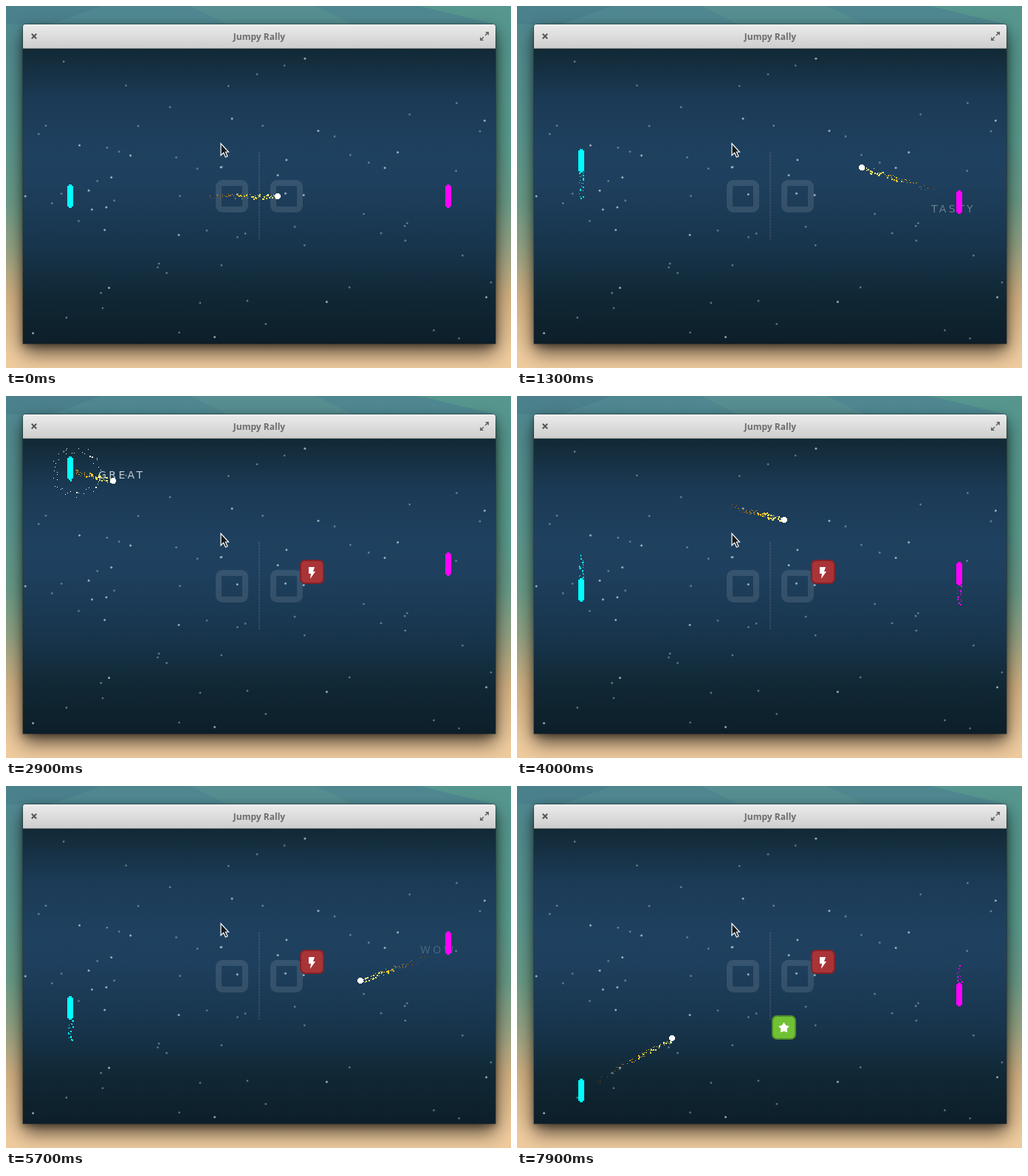
Write an HTML page with a canvas that moves like this. It is 684 px wide and 491 px high and loops after 8 s.

```html
<!DOCTYPE html>
<html lang="en">
<head>
<meta charset="utf-8">
<style>
  html, body { margin: 0; width: 684px; height: 491px; overflow: hidden; }
  body {
    position: relative;
    background: linear-gradient(#4f8791, #5a9690 35%, #6b9c88 54%, #93a384 66%, #d3b183 80%, #efcb9e 96%);
  }
  .wall, .over { position: absolute; left: 0; top: 0; }
  .window {
    position: absolute; left: 23px; top: 25px; width: 640px; height: 433px;
    border-radius: 4px 4px 0 0;
    box-shadow: 0 0 0 1px rgba(0,0,0,.25), 0 12px 26px rgba(0,0,0,.65), 0 3px 8px rgba(0,0,0,.35);
  }
  .bar {
    height: 32px; border-radius: 4px 4px 0 0; border-bottom: 1px solid #8c8c8c;
    background: linear-gradient(#ebebeb, #cecece); box-shadow: inset 0 1px #f6f6f6;
    font: bold 12px/33px "Open Sans", sans-serif; text-align: center; color: #6c6c6c;
  }
  canvas { display: block; }
</style>
</head>
<body>
<svg class="wall" width="684" height="491">
  <path d="M0 0H130L60 25H0Z" fill="#467d89" opacity=".5"/>
  <path d="M250 0H420L470 25H300Z" fill="#5f9895" opacity=".4"/>
  <path d="M560 0H684V230L663 180V25Z" fill="#5ba08e" opacity=".6"/>
</svg>
<div class="window">
  <div class="bar">Jumpy Rally</div>
  <canvas width="640" height="400"></canvas>
</div>
<svg class="over" width="684" height="491">
  <path d="M34.8 37.8l6.4 6.4M41.2 37.8l-6.4 6.4" stroke="#555" stroke-width="2"/>
  <path d="M649 40l4-4M647 42l-4 4" stroke="#666" stroke-width="1.6"/>
  <path d="M649 35H654V40ZM642 42V47H647Z" fill="#666"/>
  <path d="M291 186.5V202.5L294.7 199 297.4 205 300 203.8 297.4 198H301.5Z" fill="#16191c" stroke="#fff" stroke-width="1.2"/>
</svg>
<script>
const ctx = document.querySelector('canvas').getContext('2d');
const LOOP = 8000, STEP = 100;
const HOLD = 50;            // the ball rests on a paddle this long
const SPEED = .15;          // paddle speed, px per ms
const SHAKE = 280, WORD = 600, BURST = 440;

const serve = { t: -HOLD, x: 368, y: 258 };
const hits = [
  { t: 818, x: 591, y: 258, word: 'TASTY', wx: 561, wy: 275 },
  { t: 2596, x: 95, y: 103, word: 'GREAT', wx: 125, wy: 107 },
  { t: 5161, x: 591, y: 223, word: 'WOW', wx: 561, wy: 222 },
  { t: 7405, x: 95, y: 407 }
];
const stops = [serve, ...hits, { t: LOOP, x: 236, y: 327 }];

// Each move is [start time, y to head for].
const paddles = [
  { x: 87, color: '#0ff', moves: [[980, 165], [2200, 98], [2900, 368], [5253, 286], [6040, 423], [7500, 413]] },
  { x: 599, color: '#f0f', moves: [[600, 266], [1600, 228], [3000, 270], [3807, 213], [6200, 258], [7733, 290]] }
];

const rnd = n => { const s = Math.sin(n * 12.9898) * 43758.5453; return s - Math.floor(s); };
const spread = (n, size) => (rnd(n) - .5) * size;

function ballAt(t) {
  let i = 1;
  while (i < stops.length - 1 && t >= stops[i].t + HOLD) i++;
  const a = stops[i - 1], b = stops[i];
  const k = Math.min(1, (t - a.t - HOLD) / (b.t - a.t - HOLD));
  return [a.x + (b.x - a.x) * k, a.y + (b.y - a.y) * k];
}

function paddleAt(moves, t) {
  let y = 258;
  for (const [begin, goal] of moves) {
    const reach = Math.max(0, t - begin) * SPEED;
    y += Math.max(-reach, Math.min(reach, goal - y));
  }
  return y;
}

function rect(color, x, y, w, h = w) {
  ctx.fillStyle = color;
  ctx.fillRect(Math.round(x), Math.round(y), w, h);
}

function poly(points, color) {
  ctx.beginPath();
  points.forEach(p => ctx.lineTo(...p));
  ctx.closePath();
  ctx.fillStyle = color;
  ctx.fill();
}

function drawField() {
  for (let i = 1; i <= 80; i++) {
    const bright = i % 3 === 0;
    ctx.fillStyle = bright ? 'rgba(205,220,228,.7)' : 'rgba(165,190,203,.5)';
    ctx.beginPath();
    ctx.arc(26 + 634 * rnd(i), 64 + 390 * rnd(i + 200), bright ? 1.5 : 1.4, 0, 7);
    ctx.fill();
  }
  for (let y = 198; y < 318; y += 4) rect('rgba(190,160,180,.16)', 342, y, 2, 3);
  ctx.strokeStyle = 'rgba(255,255,255,.11)';
  ctx.lineWidth = 8;
  for (const x of [288, 362]) {
    ctx.beginPath();
    ctx.roundRect(x, 240, 36, 36, 5);
    ctx.stroke();
  }
}

function drawTile(x, y, fill, edge) {
  ctx.beginPath();
  ctx.roundRect(x + 1, y + 1, 31, 31, 6);
  ctx.fillStyle = fill;
  ctx.fill();
  ctx.strokeStyle = edge;
  ctx.lineWidth = 2;
  ctx.stroke();
}

function drawBonuses(t) {
  if (t >= 2300) {
    drawTile(398, 222, '#a93438', '#852227');
    poly([[410, 232], [418, 232], [416, 238], [419, 238], [412, 248], [413, 241], [410, 241]], '#fff');
  }
  if (t >= 7600) {
    drawTile(345, 311, '#70c234', '#528f2c');
    const star = Array.from({ length: 10 }, (_, i) => {
      const r = i % 2 ? 4.4 : 7.6, a = i * Math.PI / 5;
      return [361.5 + r * Math.sin(a), 328 - r * Math.cos(a)];
    });
    poly(star, '#fff');
  }
}

function drawWord({ word, wx, wy }, age) {
  ctx.globalAlpha = 1 - (age / WORD) ** 2;
  ctx.fillStyle = '#fff';
  ctx.font = '14px "DejaVu Sans", sans-serif';
  ctx.letterSpacing = '3.4px';
  ctx.fillText(word, wx, wy + 5);
  ctx.globalAlpha = 1;
}

function drawBurst({ x, y }, age) {
  for (let i = 0; i < 46; i++) {
    const a = i * Math.PI / 23 + spread(i, .2), r = age * (.085 + .03 * rnd(i + 90));
    rect('#fff', x + r * Math.cos(a), y + r * Math.sin(a), rnd(i + 50) > .8 ? 2 : 1);
  }
}

function drawBallTrail(t) {
  for (let k = Math.ceil((t - 430) / 4); k * 4 < t; k++) {
    const age = t - k * 4;
    if (age > 120 + 310 * rnd(k)) continue;
    const [x, y] = ballAt(k * 4);
    const size = age < 200 && rnd(k + 7000) > .55 ? 2 : 1;
    rect(`hsl(${60 - age * .09} 100% ${78 - age * .13}%)`, x + spread(k + 3000, 4), y + spread(k + 5000, 7), size);
  }
}

function drawPaddle({ x, color, moves }, t) {
  for (let k = Math.ceil((t - 280) / 9); k * 9 < t; k++) {
    const y = paddleAt(moves, k * 9), dir = Math.sign(y - paddleAt(moves, k * 9 - 9));
    if (!dir || t - k * 9 > 130 + 150 * rnd(k + 600)) continue;
    rect(color, x + spread(k, 7), y - dir * 15 + spread(k + 400, 4), rnd(k + 800) > .7 ? 2 : 1);
  }
  const y = paddleAt(moves, t);
  rect(color, x - 4, y - 14, 8, 28);
  rect(color, x - 2, y - 16, 4, 32);
}

function drawBall(t) {
  const [x, y] = ballAt(t);
  rect('#fff', x - 4, y - 2, 8, 4);
  rect('#fff', x - 2, y - 4, 4, 8);
  rect('#fff', x - 3, y - 3, 6);
}

const sky = ctx.createLinearGradient(0, 58, 0, 458);
[[0, '#122935'], [.17, '#1b3a55'], [.36, '#1f4160'], [.46, '#1e3f5d'], [.68, '#17344b'],
  [.85, '#102733'], [1, '#0c1e29']].forEach(stop => sky.addColorStop(...stop));

function draw(t) {
  // Draw in page coordinates.
  ctx.setTransform(1, 0, 0, 1, -23, -58);
  ctx.fillStyle = sky;
  ctx.fillRect(23, 58, 640, 400);
  const hit = hits.findLast(h => t >= h.t), age = hit ? t - hit.t : Infinity;
  if (age < SHAKE) {
    const size = 12 * (1 - age / SHAKE);
    ctx.translate(Math.round(spread(t, size)), Math.round(spread(t + 9, size)));
  }
  drawField();
  drawBonuses(t);
  if (age < WORD && hit.word) drawWord(hit, age);
  drawBallTrail(t);
  for (const p of paddles) drawPaddle(p, t);
  drawBall(t);
  if (age < BURST) drawBurst(hit, age);
}

const start = performance.now();
function tick() {
  const t = (performance.now() - start) % LOOP;
  draw(Math.floor(t / STEP) * STEP);
  requestAnimationFrame(tick);
}
tick();
</script>
</body>
</html>
```
